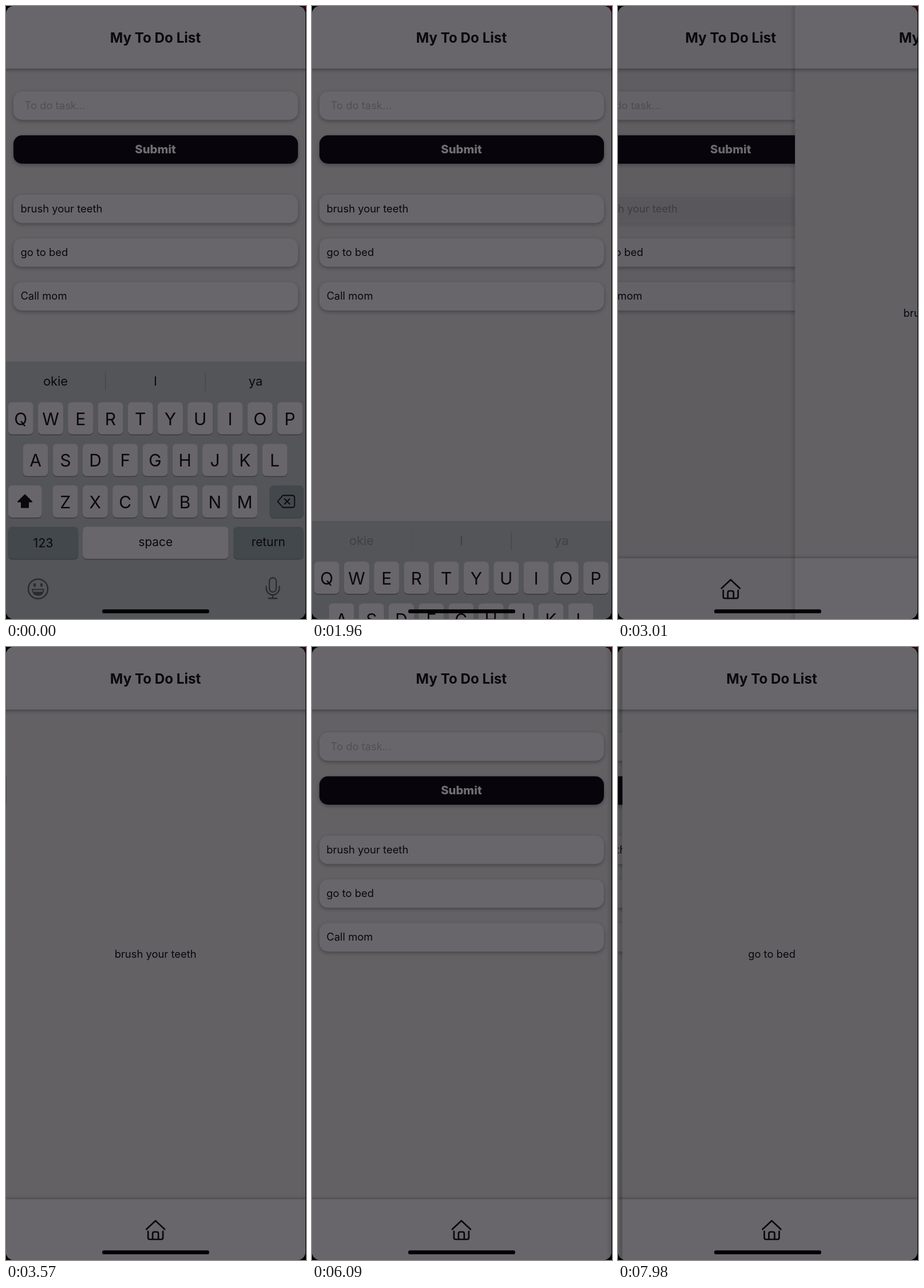
Write an HTML page with a canvas that moves like this. It is 524 by 1069 pixels and loops after 8000 ms.

```html
<!DOCTYPE html>
<html lang="en">
<head>
<meta charset="utf-8">
<title>My To Do List</title>
<style>
html, body { margin: 0; width: 100%; height: 100%; overflow: hidden; background: #000; }
canvas { display: block; }
</style>
</head>
<body>
<canvas id="stage" width="524" height="1069"></canvas>
<script>
const ctx = document.getElementById('stage').getContext('2d');
const W = 523, H = 1069, MID = 261;
const LOOP = 8000, TICK = 70;
const FONT = 'Inter, "Liberation Sans", sans-serif';
const PANEL = '#68666a', BODY = '#636164', INK = '#09080c';
const TASKS = ['brush your teeth', 'go to bed', 'Call mom'];

const clamp = v => Math.max(0, Math.min(1, v));

// Remaining distance of a critically damped spring released at `start`
function spring(t, start) {
  const u = Math.max(0, t - start) * 0.0165;
  return (1 + u) * Math.exp(-u);
}

function text(str, x, y, size, { weight = 400, align = 'left', color = INK } = {}) {
  ctx.font = `${weight} ${size}px ${FONT}`;
  ctx.textAlign = align;
  ctx.fillStyle = color;
  ctx.fillText(str, x, y);
}

function box(x, y, w, h, r, color) {
  ctx.fillStyle = color;
  ctx.beginPath();
  ctx.roundRect(x, y, w, h, r);
  ctx.fill();
}

function raised(x, y, w, h, r, color, lift = 2.5) {
  ctx.save();
  ctx.shadowColor = 'rgba(0,0,0,.3)';
  ctx.shadowBlur = 6;
  ctx.shadowOffsetY = lift;
  box(x, y, w, h, r, color);
  ctx.restore();
}

function line(d, width, color, fill) {
  const path = new Path2D(d);
  ctx.lineWidth = width;
  ctx.lineCap = ctx.lineJoin = 'round';
  ctx.strokeStyle = color;
  if (fill) {
    ctx.fillStyle = fill;
    ctx.fill(path);
  }
  ctx.stroke(path);
}

function header() {
  raised(-10, -10, W + 20, 119, 0, PANEL);
  text('My To Do List', MID, 64, 24.2, { weight: 700, align: 'center' });
}

function tabBar() {
  raised(-10, 963, W + 20, 120, 0, PANEL, -1);
  line('M245 1015.5L261 1000.5L277 1015.5', 2.7, INK);
  line('M248 1019V1030Q248 1033 251 1033H271Q274 1033 274 1030V1019', 2.7, INK);
  line('M256 1033V1023Q256 1020 259 1020H263Q266 1020 266 1023V1033', 2.7, INK);
}

// Draws one screen shifted by dx, cut to its own bounds
function page(dx, content) {
  ctx.save();
  ctx.translate(dx, 0);
  ctx.beginPath();
  ctx.rect(0, 0, W, H);
  ctx.clip();
  ctx.fillStyle = BODY;
  ctx.fillRect(0, 0, W, H);
  header();
  content();
  tabBar();
  ctx.restore();
}

function caretAlpha(t) {
  if (t >= 1820) return 0;
  const u = Math.min(t, 1300) % 1050;
  return clamp((u - 10) / 200) * clamp((840 - u) / 280);
}

function listPage(t, pressed) {
  raised(13, 149, 497, 49.5, 15, PANEL);
  text('To do task...', 32.6, 180, 18.4, { color: '#514f53' });
  ctx.globalAlpha = caretAlpha(t);
  box(33.3, 162, 2.7, 23.5, 1.3, '#0d3269');
  ctx.globalAlpha = 1;

  raised(13, 225.5, 497, 49.5, 15, '#07050b');
  text('Submit', MID, 257, 20.3, { weight: 800, align: 'center', color: '#706e72' });

  TASKS.forEach((task, i) => {
    const y = 329 + i * 76.2;
    ctx.globalAlpha = i === pressed ? 0.35 : 1;
    raised(13, y, 497, 49.5, 15, PANEL);
    text(task, 25.4, Math.round(y + 31), 18.4);
  });
  ctx.globalAlpha = 1;
}

function detailPage(task) {
  text(task, MID, 542, 18.4, { align: 'center' });
}

function key(x, y, w, label, size = 30, color = PANEL, base = 39.5) {
  box(x, y + 1.6, w, 56, 7, '#3b3b40');
  box(x, y, w, 56, 7, color);
  text(label, x + w / 2, y + base, size, { align: 'center' });
}

function keyRow(letters, x, y) {
  [...letters].forEach((c, i) => key(x + i * 52.25, y, 44, c));
}

function suggestions(alpha) {
  ctx.globalAlpha = alpha;
  text('okie', 86.5, 662, 21.8, { align: 'center' });
  text('I', MID, 662, 21.8, { align: 'center' });
  text('ya', 436, 662, 21.8, { align: 'center' });
  ctx.fillStyle = '#46474b';
  ctx.fillRect(173, 639, 1.3, 32);
  ctx.globalAlpha = 1;
  ctx.fillRect(347.5, 639, 1.3, 32);
}

function keyboard(rest) {
  const grey = '#43484c', icon = '#2b2b2f';
  ctx.save();
  ctx.translate(0, (1 - rest) * 449);
  ctx.fillStyle = '#545559';
  ctx.fillRect(0, 620, W, 449);
  suggestions(Math.pow(rest, 1.4));

  keyRow('QWERTYUIOP', 3.7, 691);
  keyRow('ASDFGHJKL', 29.5, 763.7);
  keyRow('ZXCVBNM', 81.6, 836);
  key(3.7, 836, 59, '');
  key(460.5, 836, 59, '', 30, grey);
  key(3.7, 908, 122.5, '123', 21.3, grey, 36);
  key(134, 908, 254.5, 'space', 20.8, PANEL, 34);
  key(397, 908, 122.5, 'return', 20.8, grey, 34);

  line('M33 852.5L45 864.5H39V874.5H27V864.5H21Z', 2, INK, INK);
  line('M483.5 853.5H500Q504 853.5 504 857.5V870.5Q504 874.5 500 874.5H483.5L474.5 864Z', 1.8, INK);
  line('M486.5 859.5L495.5 868.5M495.5 859.5L486.5 868.5', 1.8, INK);

  line('M39 1016.5a17 17 0 1 0 34 0a17 17 0 1 0 -34 0', 2.5, icon);
  box(48, 1006.5, 4, 6.5, 2, icon);
  box(60, 1006.5, 4, 6.5, 2, icon);
  line('M46 1017.5H66Q65 1027.5 56 1027.5Q47 1027.5 46 1017.5Z', 1.8, icon);
  line('M48 1022H64Q62 1027.5 56 1027.5Q50 1027.5 48 1022Z', 1.2, icon, icon);

  line('M460 1003a6 6 0 0 1 12 0V1016a6 6 0 0 1 -12 0Z', 2.3, icon);
  line('M454.5 1012V1015.5a11.5 11.5 0 0 0 23 0V1012M466 1027V1033M458.5 1033H473.5', 2.3, icon);
  ctx.restore();
}

// Share of the width by which the detail screen is still off to the right
function detailOffset(t) {
  if (t < 5503) return spring(t, 2925);
  return t < 7000 ? 1 - spring(t, 5503) : spring(t, 7603);
}

function pressedRow(t) {
  if (t >= 2800 && t < 3150) return 0;
  if (t >= 7490 && t < 7770) return 1;
  return -1;
}

function draw(t) {
  const off = detailOffset(t), shown = 1 - off, x = off * W;

  ctx.fillStyle = '#000';
  ctx.fillRect(0, 0, 524, H);
  ctx.fillStyle = '#350410';
  ctx.fillRect(517, 0, 7, 6);

  ctx.save();
  ctx.beginPath();
  ctx.roundRect(0, 0, W, H, 14);
  ctx.clip();

  page(-0.3 * W * shown, () => listPage(t, pressedRow(t)));
  if (shown > 0.0005) {
    ctx.fillStyle = `rgba(0,0,0,${0.1 * shown})`;
    ctx.fillRect(0, 0, x, H);
    const edge = ctx.createLinearGradient(x - 9, 0, x, 0);
    edge.addColorStop(0, 'rgba(0,0,0,0)');
    edge.addColorStop(1, 'rgba(0,0,0,.12)');
    ctx.fillStyle = edge;
    ctx.fillRect(x - 9, 0, 9, H);
    page(x, () => detailPage(TASKS[t < 7000 ? 0 : 1]));
  }
  if (t < 2400) keyboard(spring(t, 1833));

  box(168, 1052.3, 187, 6.8, 3.4, '#020103');
  ctx.restore();
}

function loop() {
  const t = performance.now() % LOOP;
  draw(Math.floor(t / TICK) * TICK);
  requestAnimationFrame(loop);
}
loop();
</script>
</body>
</html>
```
